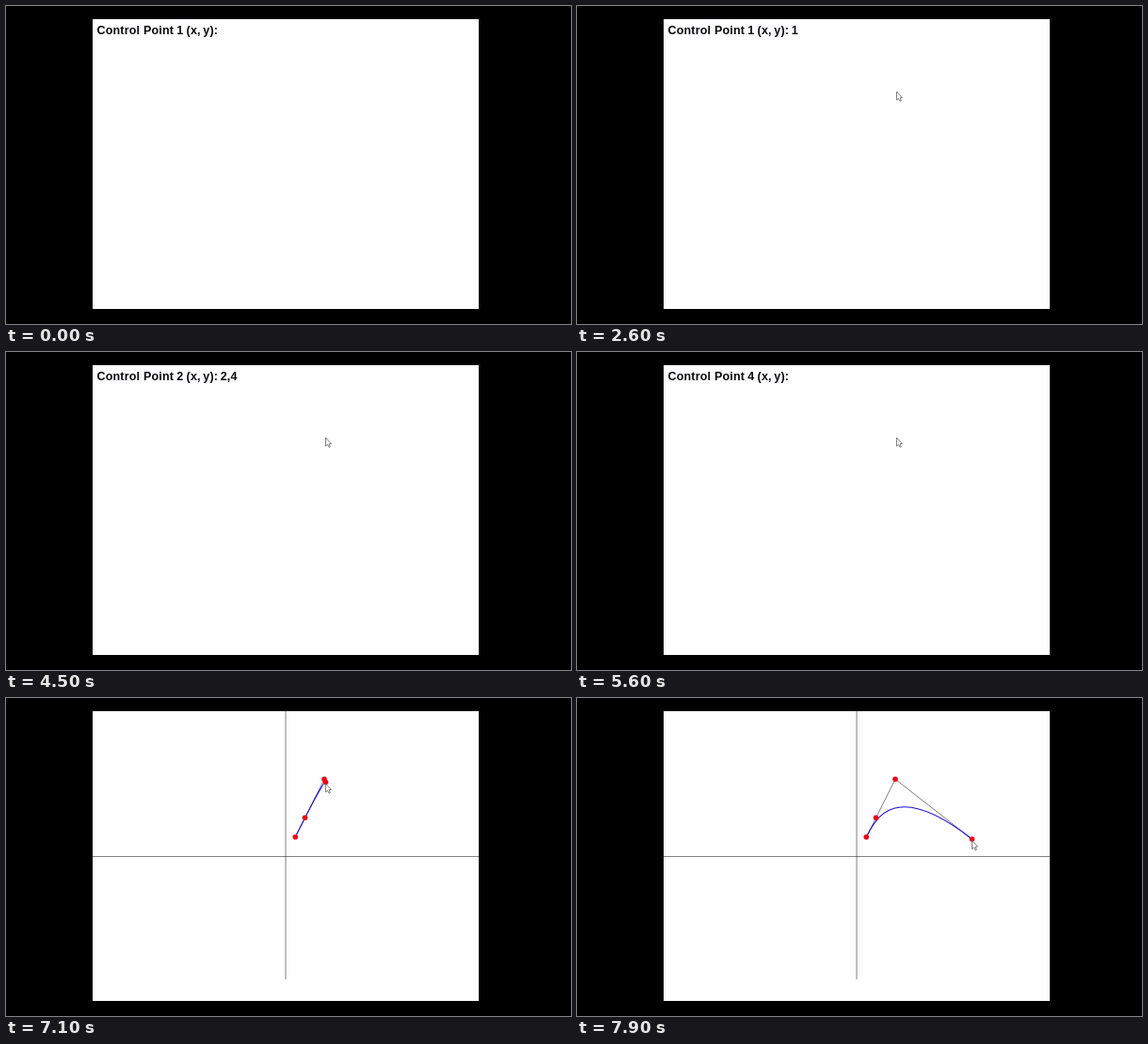
An HTML page for the animation above (8 s loop, 600 px wide and 338 px high).

```html
<!DOCTYPE html>
<html lang="en">
<head>
<meta charset="utf-8">
<title>Bezier control points</title>
<style>
  html, body { margin: 0; width: 100%; height: 100%; overflow: hidden; background: #000; }
  svg { display: block; width: 600px; height: 338px; }
  text { font: bold 12.5px "Liberation Sans", Arial, sans-serif; letter-spacing: .15px; fill: #0a0a0a; }
  .line { fill: none; stroke: #000; stroke-opacity: .62; stroke-width: .8; }
  #curve { fill: none; stroke: #1a12d8; stroke-width: 1.1; }
  circle { fill: #ea0612; }
</style>
</head>
<body>
<svg viewBox="0 0 600 338">
  <rect x="92" y="14" width="410" height="308" fill="#fefdff"/>
  <text id="prompt" y="30">
    <tspan x="96.6">Control</tspan><tspan x="146">Point</tspan><tspan x="181.3" id="index">1</tspan><tspan x="191.6">(x,</tspan><tspan x="209.3">y):</tspan><tspan x="227.7" id="value"></tspan>
  </text>
  <g id="plot">
    <path class="line" d="M92 168.5H502M297 14V299"/>
    <path class="line" id="hull"/>
    <path id="curve"/>
    <g id="dots"></g>
  </g>
  <path id="cursor" d="M0 0V9L2 7.2L3.5 10.3L4.9 9.6L3.5 6.7L6 6.4Z"
        fill="#fff" stroke="#555" stroke-width=".75" stroke-linejoin="round"/>
</svg>
<script>
const LOOP = 8000, PLOT_AT = 7100;
const UNIT = 10.25, ORIGIN = [297, 168.3];

// [time, point number, typed value]
const typing = [
  [0, 1, ""], [2600, 1, "1"], [3000, 1, "1,"], [3200, 1, "1,2"],
  [3300, 2, ""], [3900, 2, "2"], [4200, 2, "2,"], [4500, 2, "2,4"],
  [4600, 3, ""], [4900, 3, "4"], [5200, 3, "4,"], [5500, 3, "4,8"],
  [5600, 4, ""], [6400, 4, "3"], [6700, 4, "3,"], [6900, 4, "3,9"]
];

// [time, x, y]; no position means hidden
const pointer = [
  [0], [700, 484.5, 269.5], [800, 440.5, 153.5], [900],
  [1700, 353.5, 44.5], [1800, 339.5, 91],
  [7500, 346.5, 112.5], [7600, 361.5, 137.5], [7700, 380, 156],
  [7800, 402, 160], [7900, 419.5, 151.5]
];

const $ = id => document.getElementById(id);
const at = (steps, t) => steps.findLast(s => s[0] <= t);
const show = (el, on) => el.style.display = on ? "" : "none";
const toStage = ([x, y]) => [ORIGIN[0] + x * UNIT, ORIGIN[1] - y * UNIT];

const fixed = [[1, 2], [2, 4], [4, 8]].map(toStage);
const dots = Array.from({ length: 4 }, () => {
  const dot = document.createElementNS("http://www.w3.org/2000/svg", "circle");
  dot.setAttribute("r", 2.8);
  return $("dots").appendChild(dot);
});

function drawPlot(end) {
  const points = [...fixed, end];
  points.forEach(([x, y], i) => {
    dots[i].setAttribute("cx", x);
    dots[i].setAttribute("cy", y);
  });
  $("hull").setAttribute("d", "M" + points.join("L"));
  $("curve").setAttribute("d", `M${points[0]}C${points.slice(1).join(" ")}`);
}

function draw(t) {
  const [, index, value] = at(typing, t);
  $("index").textContent = index;
  $("value").textContent = value;
  show($("prompt"), t < PLOT_AT);

  const [, x, y] = at(pointer, t);
  const visible = x !== undefined;
  show($("cursor"), visible);
  if (visible) $("cursor").setAttribute("transform", `translate(${x} ${y})`);

  show($("plot"), t >= PLOT_AT);
  if (t >= PLOT_AT) drawPlot([x, y - 1.5]);
}

function tick() {
  draw(performance.now() % LOOP);
  requestAnimationFrame(tick);
}
tick();
</script>
</body>
</html>
```
